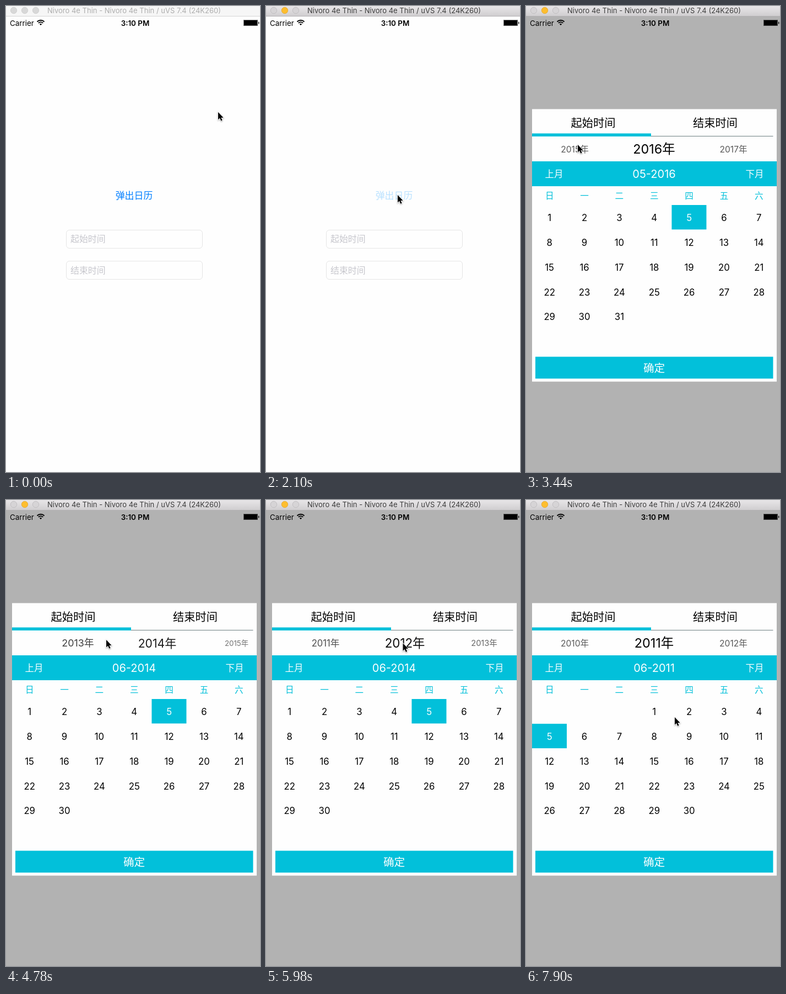
Write an HTML page that moves like this. It is 461 px wide and 843 px high and loops after 8 s.

```html
<!DOCTYPE html>
<html lang="zh-CN">
<head>
<meta charset="utf-8">
<style>
  html, body { margin: 0; width: 100%; height: 100%; overflow: hidden; background: #fefefe; }
  svg { display: block; width: 461px; height: 843px; }
  text { font-family: Inter, "Noto Sans CJK SC", "Noto Sans CJK", sans-serif; white-space: pre; }
  #cursor { filter: drop-shadow(0 1px 1px rgba(0, 0, 0, .35)); }
</style>
</head>
<body>
<svg id="stage" viewBox="0 0 461 843"></svg>
<script>
const LOOP = 8000, TICK = 149.06; // the screen refreshes in hard steps
const CYAN = '#02c0da';
const CENTER = 232.5, YEAR_GAP = 144;
const PANEL_X = 11, CELL_W = 63.36, CELL_H = 44.8;
const DEVICE = 'Nivoro 4e Thin';

// Ticks at which something happens
const PRESS = 14, OPEN = 15, FIRST_TAP = 24, SECOND_TAP = 29, RELEASE = 32, REST = 37, SETTLE = 46;

const lerp = (a, b, k) => a + (b - a) * k;
const clamp01 = k => Math.min(1, Math.max(0, k));

// The pointer glides between a few stops
const pointerStart = { x: 385, y: 192 };
const pointerMoves = [
  { from: 3, to: 10, x: 278, y: 350 },
  { from: 10, to: 12, x: 239, y: 342 },
  { from: 17, to: 23, x: 94, y: 251 },
  { from: 23, to: 27, x: 137, y: 264 },
  { from: 28, to: RELEASE, x: 182, y: 253 },
  { from: RELEASE, to: 36, x: 201, y: 261 },
  { from: 36, to: 45, x: 308, y: 257 },
  { from: 48, to: 51, x: 229, y: 335 },
  { from: 51, to: 53, x: 270, y: 393 }
];

function pointerAt(tick) {
  return pointerMoves.reduce((at, move) => {
    const k = clamp01((tick - move.from) / (move.to - move.from));
    return { x: lerp(at.x, move.x, k), y: lerp(at.y, move.y, k) };
  }, pointerStart);
}

function chosenYear(tick) {
  if (tick < FIRST_TAP) return 2016;
  if (tick < SECOND_TAP) return 2015;
  return tick < SETTLE ? 2014 : 2011;
}

// Year in the middle of the strip: dragged, flung to a stop, dragged again, snapped
function stripYear(tick) {
  const dragged = grabX => Math.max(0, pointerAt(Math.min(tick, RELEASE + (tick > REST) * LOOP)).x - grabX) / YEAR_GAP;
  if (tick <= SECOND_TAP || tick >= SETTLE) return chosenYear(tick);
  if (tick > REST) return 2012 - dragged(229);
  const left = 1 - clamp01((tick - RELEASE) / (REST - RELEASE));
  return lerp(2012, 2014 - dragged(140), left ** 1.6);
}

const rect = (x, y, w, h, fill, more = '') =>
  `<rect x="${x}" y="${y}" width="${w}" height="${h}" fill="${fill}" ${more}/>`;

// Text placed by its vertical middle
const label = (str, x, y, size, fill = '#000', more = 'text-anchor="middle"') =>
  `<text x="${x}" y="${y + size * 0.36}" font-size="${size}" fill="${fill}" ${more}>${str}</text>`;

function titleBar(active) {
  const lights = [14, 34, 54].map(x => {
    const lit = active && x === 34;
    const fill = lit ? '#fdbe2f' : active ? '#d6d4d6' : '#d8d8d8';
    const edge = lit ? '#e0a52c' : active ? '#bbb9bb' : '#cbcbcb';
    return `<circle cx="${x}" cy="8" r="5.7" fill="${fill}" stroke="${edge}" stroke-width=".8"/>`;
  }).join('');
  return `<defs><linearGradient id="bar" x2="0" y2="1">
      <stop stop-color="#e8e6e8"/><stop offset="1" stop-color="#d0ced0"/></linearGradient></defs>` +
    rect(0, 0, 461, 18, active ? 'url(#bar)' : '#f6f6f6') +
    rect(0, 18, 461, 1, active ? '#b3b1b3' : '#d5d5d5') + lights +
    label(`${DEVICE} - ${DEVICE} / uVS 7.4 (24K260)`, CENTER, 8.5, 13, active ? '#3c3c3c' : '#adadad');
}

function statusBar() {
  const arc = r => `<path d="M${63 - r * .72} ${35 - r * .72}A${r} ${r} 0 0 1 ${63 + r * .72} ${35 - r * .72}"/>`;
  return label('Carrier', 7, 31, 13.4, '#000', '') +
    label('3:10 PM', 234.5, 31, 13.4, '#000', 'text-anchor="middle" font-weight="600"') +
    `<g fill="none" stroke="#000" stroke-width="1.9">${arc(9)}${arc(5.7)}</g>
     <path d="M63 35l-2.1-2.2a3 3 0 0 1 4.2 0z"/>` +
    rect(431.5, 25.5, 25, 10, '#000', 'stroke="#666"') +
    rect(458, 28.5, 1.3, 4, '#000', 'rx=".6"');
}

function form(pressed) {
  const field = (y, hint) =>
    rect(109.5, y, 247, 33, '#fefefe', 'rx="5.5" stroke="#e3e3e3" stroke-width=".9"') +
    label(hint, 117, y + 16.3, 15.9, '#c7c7cd', '');
  return label('弹出日历', CENTER, 343, 16.9, pressed ? '#b9e1ff' : '#007fff') +
    field(405.3, '起始时间') + field(461.5, '结束时间');
}

function yearStrip(middle) {
  let out = '';
  for (let year = Math.floor(middle) - 2; year <= middle + 3; year++) {
    const far = Math.abs(year - middle);
    out += label(year + '年', CENTER + (year - middle) * YEAR_GAP, 259, 15.6 * (1.5 - far / 2), '#000',
      `text-anchor="middle" fill-opacity="${1 - far * .35}"`);
  }
  return `<clipPath id="strip">${rect(17, 236, 432, 45, '#000')}</clipPath>
    <g clip-path="url(#strip)">${out}</g>`;
}

function monthGrid(month, year) {
  const first = new Date(year, month - 1, 1).getDay();
  const count = new Date(year, month, 0).getDate();
  const columnX = col => PANEL_X + (col + .5) * CELL_W;
  let out = [...'日一二三四五六'].map((day, col) => label(day, columnX(col), 343, 15.6, CYAN)).join('');
  for (let day = 1; day <= count; day++) {
    const slot = first + day - 1, col = slot % 7, row = Math.floor(slot / 7);
    const picked = day === 5;
    if (picked) out += rect(PANEL_X + col * CELL_W, 360 + row * CELL_H, 63, 44.3, CYAN);
    out += label(day, columnX(col), 383.2 + row * CELL_H, 16.7, picked ? '#fff' : '#000');
  }
  return out;
}

function calendar(tick) {
  const year = chosenYear(tick), month = year === 2016 ? 5 : 6;
  return rect(0, 18.5, 461, 824.5, '#000', 'opacity=".3"') +
    rect(PANEL_X, 186.5, 444, 493, '#fefefe') +
    label('起始时间', 122, 211.5, 20.2) + label('结束时间', 343.5, 211.5, 20.2) +
    rect(227, 235, 221.5, 1, '#6e7f82') + rect(PANEL_X, 230.5, 216, 5.5, CYAN) +
    yearStrip(stripYear(tick)) +
    rect(PANEL_X, 281, 444, 45, CYAN) +
    label('上月', 51, 304, 16.5, '#fff') + label('下月', 415, 304, 16.5, '#fff') +
    label(`0${month}-${year}`, CENTER, 304, 20, '#fff') +
    monthGrid(month, year) +
    rect(17, 634.5, 431.5, 39.5, CYAN) + label('确定', CENTER, 654.5, 19.6, '#fff');
}

function cursor(tick) {
  const { x, y } = pointerAt(tick);
  return `<g id="cursor" transform="translate(${x} ${y})">
    <path d="M0 0V13.6L3.1 10.7 5.3 15.8 7.6 14.8 5.4 9.9H9.6Z" stroke="#fff" stroke-width="1.6" paint-order="stroke"/></g>`;
}

const stage = document.getElementById('stage');
let shownTick = -1;
function draw() {
  const tick = Math.floor(performance.now() % LOOP / TICK);
  if (tick !== shownTick) {
    shownTick = tick;
    stage.innerHTML = rect(0, 0, 461, 843, '#fefefe') + statusBar() + form(tick === PRESS) +
      (tick >= OPEN ? calendar(tick) : '') + titleBar(tick >= PRESS) + cursor(tick);
  }
  requestAnimationFrame(draw);
}
draw();
</script>
</body>
</html>
```
